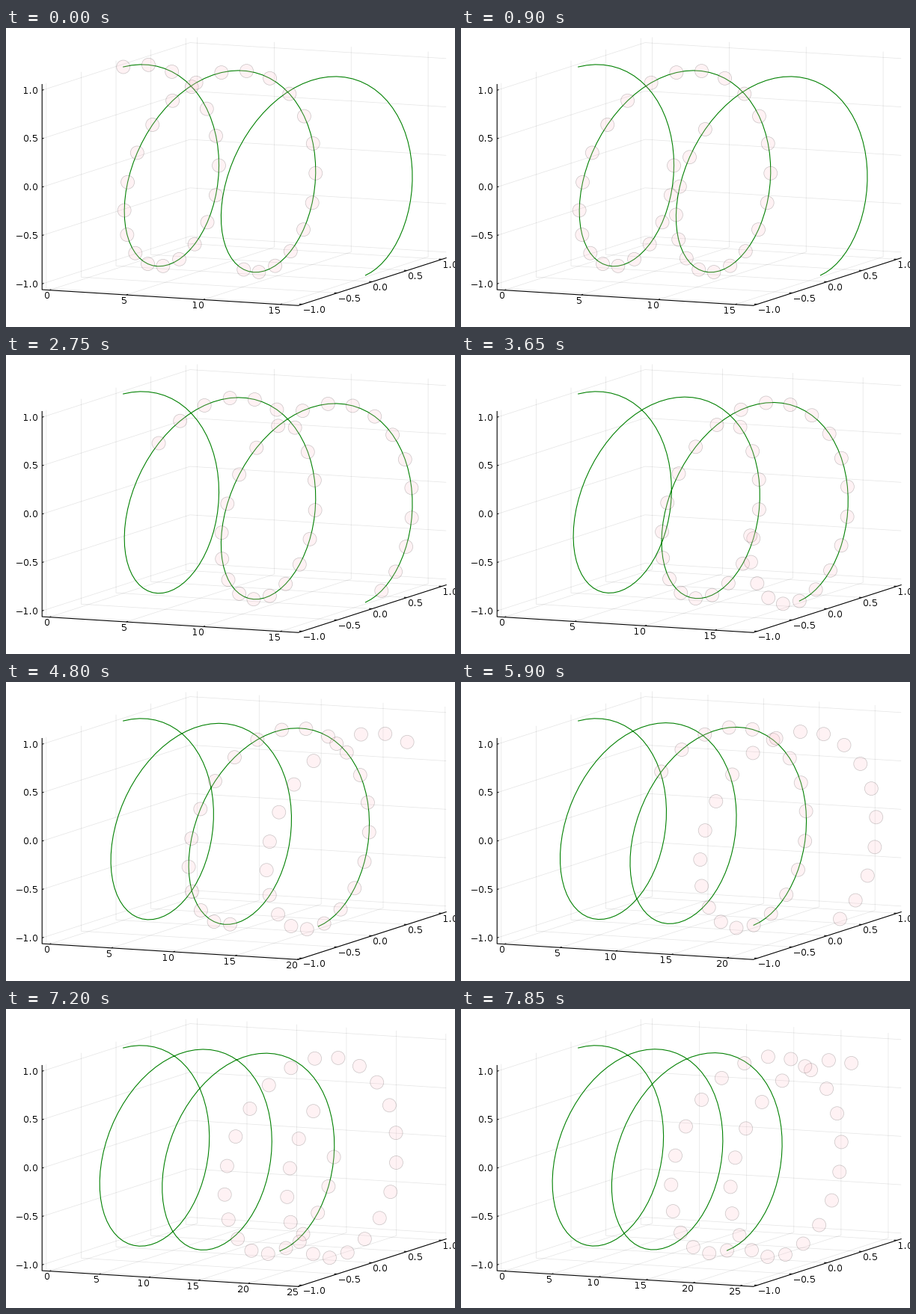
Write a matplotlib script that moves like this. It is 600 px wide and 400 px high and loops after 7900 ms.

```python
import numpy as np
import matplotlib.pyplot as plt
from matplotlib.animation import FuncAnimation
from matplotlib.collections import LineCollection
from matplotlib.patches import Circle

plt.rcParams.update({
    "font.family": "DejaVu Sans",
    "text.hinting": "default",
    "text.hinting_factor": 1,
})

W, H, DPI = 600, 400, 100
PX = 72 / DPI
FRAMES, STEP = 158, 0.1
PAD = 0.03

# Viewport and camera (azimuth 30, tilt 30)
LEFT, RIGHT, TOP, BOTTOM = 48.2, 588.2, 11.8, 371.3
AZ, TILT = np.radians(30), np.radians(30)
SX = (RIGHT - LEFT) / (np.cos(AZ) + np.sin(AZ))
SY = (BOTTOM - TOP) / (np.tan(TILT / 2) + np.cos(TILT))
UX, VX = SX * np.cos(AZ), SX * np.sin(AZ)
UY = SY * np.sin(AZ) ** 2 * np.tan(TILT / 2)
VY = SY * np.cos(AZ) ** 2 * np.tan(TILT / 2)
WY = SY * np.cos(TILT)
TICK = 0.012


def project(u, v, w):
    """Unit-box coordinates to stage pixels."""
    return np.stack(np.broadcast_arrays(
        LEFT + UX * u + VX * v,
        BOTTOM - UY + UY * u - VY * v - WY * w), axis=-1)


def unit(val, lo=-1, hi=1):
    """Place a value inside the padded axis range."""
    pad = PAD * (hi - lo)
    return (val - lo + pad) / (hi - lo + 2 * pad)


def helix(t, xmax):
    return project(unit(t, 0, xmax), unit(np.sin(t)), unit(np.cos(t)))


def path(*corners):
    return np.array([project(*c) for c in corners])


def label(pos, text, dx, dy, ha):
    return ax.text(pos[0] + dx, pos[1] + dy, text, ha=ha, va="baseline",
                   fontsize=12 * PX, color="black", zorder=5)


def segments(width, color, z):
    return ax.add_collection(LineCollection(
        [], linewidths=width * PX, colors=[color], zorder=z, snap=False))


fig = plt.figure(figsize=(W / DPI, H / DPI), dpi=DPI, facecolor="white")
ax = fig.add_axes([0, 0, 1, 1])
ax.set_xlim(0, W)
ax.set_ylim(H, 0)
ax.axis("off")

grid = segments(0.75, (0, 0, 0, 0.1), 1)
ticks = segments(1, "black", 4)

fixed_grid, fixed_ticks = [], []
for val in np.arange(-1, 1.1, 0.5):
    a = unit(val)
    text = f"{val:.1f}".replace("-", "\u2212")
    fixed_grid += [path((1, a, 0), (0, a, 0), (0, a, 1)),
                   path((0, 0, a), (0, 1, a), (1, 1, a))]
    fixed_ticks += [path((1, a, 0), (1 - TICK, a, 0)),
                    path((0, 0, a), (0, TICK, a))]
    label(project(1, a, 0), text, 1, 11.5, "left")
    label(project(0, 0, a), text, -5, 4.3, "right")

edges = path((0, 0, 1), (0, 0, 0), (1, 0, 0), (1, 1, 0))
ax.plot(*edges.T, color="black", lw=1.1 * PX, zorder=4, snap=False)

curve_t = np.arange(0, 5 * np.pi, 0.1)
dot_t = np.arange(34) * 0.3
curve, = ax.plot([], [], color="green", lw=1.1 * PX, zorder=2)
dots = [ax.add_patch(Circle((0, 0), 9, fc=(1, 0.753, 0.796, 0.2),
                            ec=(0, 0, 0, 0.2), lw=0.75 * PX, zorder=3))
        for _ in dot_t]
x_vals = np.arange(0, 30, 5)
x_labels = [label((0, 0), str(v), 0, 0, "right") for v in x_vals]


def draw(frame):
    t = dot_t + frame * STEP
    xmax = max(curve_t[-1], t[-1])
    curve.set_data(*helix(curve_t, xmax).T)
    for dot, pos in zip(dots, helix(t, xmax)):
        dot.center = pos

    lines, marks = list(fixed_grid), list(fixed_ticks)
    for val, text in zip(x_vals, x_labels):
        a = unit(val, 0, xmax)
        text.set_visible(a <= 1)
        if a > 1:
            continue
        lines.append(path((a, 0, 0), (a, 1, 0), (a, 1, 1)))
        marks.append(path((a, 0, 0), (a, TICK, 0)))
        x, y = project(a, 0, 0)
        text.set_position((x + 1, y + 11.7))
    grid.set_segments(lines)
    ticks.set_segments(marks)
    return [curve, grid, ticks, *dots, *x_labels]


anim = FuncAnimation(fig, draw, frames=FRAMES, interval=50,
                     repeat=True, repeat_delay=0, blit=False)
plt.show()
```
